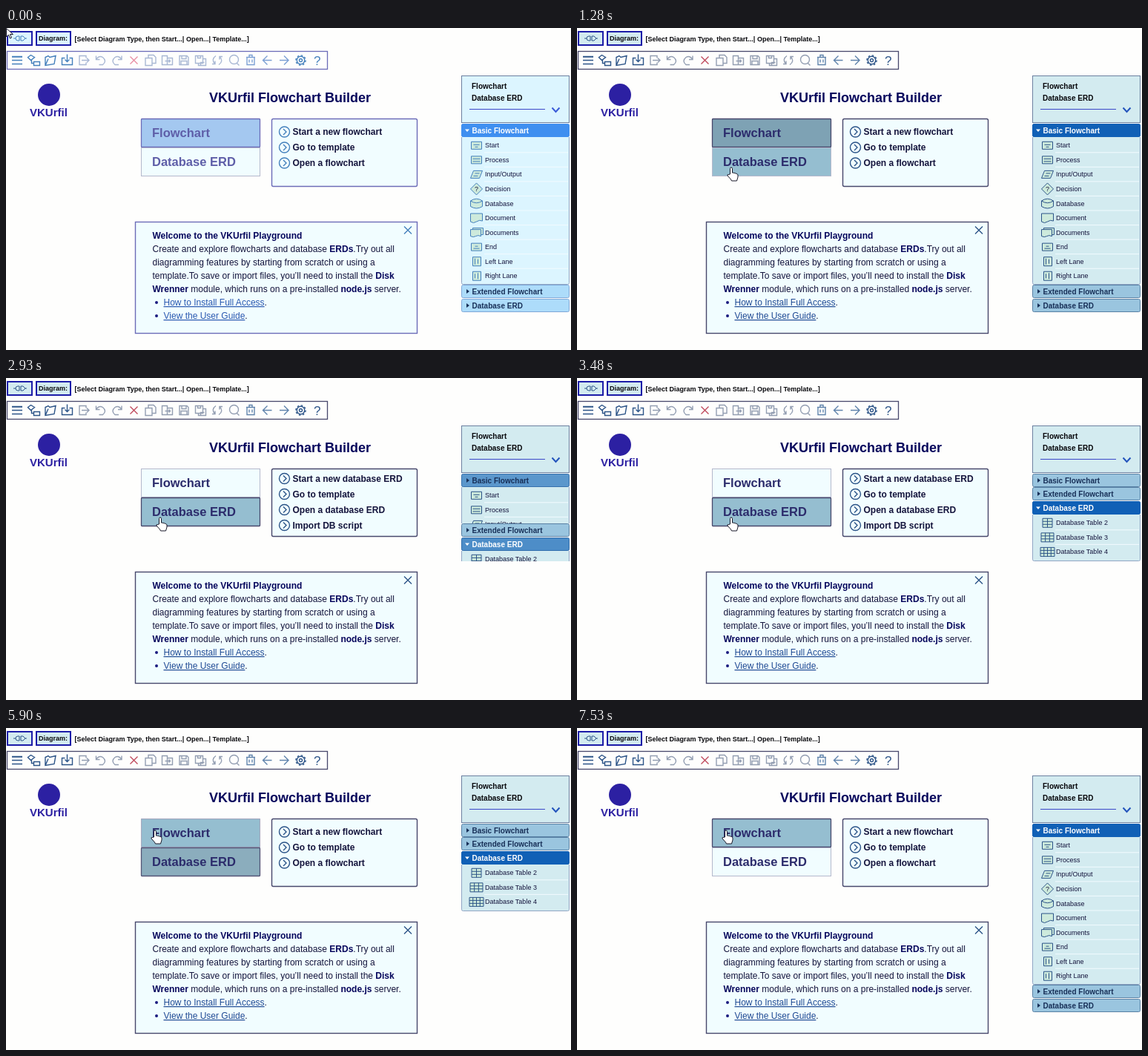
These frames come from a looping animation (762x434 px, 8000 ms). An HTML page:

```html
<!DOCTYPE html>
<html lang="en">
<head>
<meta charset="utf-8">
<title>Flowchart Builder</title>
<style>
html, body { margin: 0; width: 100%; height: 100%; overflow: hidden; background: #fefefd; }
svg { display: block; }
#stage { width: 762px; height: 434px; }
text { font-family: "Liberation Sans", Arial, sans-serif; font-size: 12px; fill: #14143c; white-space: pre; }
.b { font-weight: bold; }
.navy { fill: #06065c; }
.black { fill: #08080c; }
.icon { fill: none; stroke: var(--icon); stroke-width: 1.4; }
.off { stroke: var(--off); }
.shape { fill: #cdeadc; stroke: var(--icon); stroke-width: 1; }
.link { fill: var(--link); text-decoration: underline; }
.panel { fill: var(--panel); }
.card { fill: #f1fdff; stroke: var(--frame); stroke-width: 1.4; }
.frame { fill: none; stroke: var(--frame); stroke-width: 1.3; }
.tag { fill: var(--panel); stroke: #1c1ca8; stroke-width: 2; }
.bar { fill: var(--bar); stroke: var(--edge); }
.active { fill: var(--active); stroke: var(--active); }
</style>
</head>
<body>
<svg id="stage" viewBox="0 0 762 434"></svg>
<script>
const LOOP = 8000;
const BASIC_HEIGHT = 199, ERD_HEIGHT = 63;
const CLICK_ERD = 2450, CLICK_FLOW = 5880;
const OPEN_ERD = 2730, OPEN_BASIC = 6370;

// Each colour settles from its first value to its second as the loop begins.
const palette = {
  panel: ['#dcf5ff', '#d3ebf0'],
  bar: ['#addcfa', '#9ac5df'],
  edge: ['#7fa8d8', '#5880a4'],
  active: ['#3f8ff0', '#1060b6'],
  chosen: ['#a4c8f0', '#7ea2b4'],
  label: ['#5e5ea8', '#2c2c6c'],
  icon: ['#4480bc', '#2c5488'],
  off: ['#a9b8d4', '#939eb2'],
  arrow: ['#7ca0d4', '#6084ac'],
  cross: ['#e88fa4', '#c04a5c'],
  frame: ['#6c6cb8', '#48486c'],
  link: ['#2a58b0', '#204a94'],
  accent: ['#3c5cd8', '#2454bc'],
};

const rect = (x, y, w, h, attrs = '') => `<rect x="${x}" y="${y}" width="${w}" height="${h}" ${attrs}/>`;
const text = (x, y, s, size = 12, cls = '') => `<text x="${x}" y="${y}" style="font-size:${size}px" class="${cls}">${s}</text>`;
const bold = (x, y, s, size = 12, cls = '') => text(x, y, s, size, 'b ' + cls);
const path = (x, y, d, attrs) => `<path transform="translate(${x} ${y})" d="${d}" ${attrs}/>`;
const strong = s => `<tspan class="b navy">${s}</tspan>`;

// Paths around each icon's centre, with the colour where it is not the usual one
const toolbar = [
  ['M-7-5H7M-7 0H7M-7 5H7M-7-4.500H7M-7.500H7M-7 4.500H7'],
  ['M-8-4l4-3 5 3-5 4zM-3 0v4h3M0 2h8v5H0z'],
  ['M-7 7V-4l4-2 2 2 8-2-2 11zM-7 7l4-9'],
  ['M-3-3h-4V6H7V-3H3M0-8V2M-3-1l3 3 3-3'],
  ['M3-3V-6H-6V6H3V3M-3 0H7M4-3l3 3-3 3', 'off'],
  ['M-6-6v5h5M-6-1Q-2-7 3-4 9 1 3 6H-2', 'off'],
  ['M6-6v5H1M6-1Q2-7-3-4-9 1-3 6H2', 'off'],
  ['M-5-5L5 5M5-5L-5 5', 'cross'],
  ['M-7-3H2V7H-7ZM-3-3V-7H4L7-4V4H2', 'off'],
  ['M-7-6H0V6H-7ZM0-3H7V6H0M-3 1H4M2-1l2 2-2 2', 'off'],
  ['M-6-6H4L6-4V6H-6ZM-3-6v4h6v-4M-4 6V1h8v5', 'off'],
  ['M-7-6H3V4H-7ZM-4-6v3h4v-3M-3 4v3H7V-2H3M0 7V3h5', 'off'],
  ['M-2-6Q-9-1-3 5M-3 1v4h-4M2 6Q9 1 3-5M3-1v-4h4', 'off'],
  ['M-6-1a6 6 0 1 0 12 0a6 6 0 1 0-12 0M4 4l3 3', 'off'],
  ['M-6-4H6M-2-4v-3h4v3M-5-4V6H5V-4M-2-1v4M2-1v4', 'arrow'],
  ['M6 0H-5M0-6l-6 6 6 6', 'arrow'],
  ['M-6 0H5M0-6l6 6-6 6', 'arrow'],
].map(([d, color = 'icon'], i) => path(15 + i * 22.5, 43.5, d, `class="icon" style="stroke:var(--${color})"`)).join('');

const gear = `<g transform="translate(397.5 43.5)" class="icon"><circle r="5.2"/><circle r="2"/>
  <circle r="6.6" stroke-dasharray="2.6 2.58"/></g>`;

const doc = 'M-8-6H8V4Q4 2 0 5T-8 5Z';
const basicItems = [
  ['Start', 'M-7-5H7V5H-7ZM-4-1H4M-2 2H2'],
  ['Process', 'M-7-5H7V5H-7ZM-5-1.5H5M-5 2H5'],
  ['Input/Output', 'M-4-5H8L4 5H-8ZM-2-1.5H4M-4 2H2'],
  ['Decision', 'M0-8L8 0 0 8-8 0Z'],
  ['Database', 'M-8-3.5V4Q0 9 8 4V-3.5Q0-9-8-3.5 0 2 8-3.5'],
  ['Document', doc],
  ['Documents', 'M-5-4V-6H9V3H6M-8-4H6V5Q2 3-1 5T-8 5Z'],
  ['End', 'M-7-5H7V5H-7ZM-2-1H2M-4 2H4'],
  ['Left Lane', 'M-5-6H6V6H-5ZM-2-4V4M2-3V3'],
  ['Right Lane', 'M-5-6H6V6H-5ZM-2-3V3M2-4V4'],
];
const erdItems = [[2, 13], [3, 17], [4, 19]].map(([columns, w]) => {
  let d = `M${-w / 2}-6h${w}v12h${-w}zM${-w / 2}-2h${w}m0 4h${-w}`;
  for (let i = 1; i < columns; i++) d += `M${-w / 2 + w * i / columns}-6v12`;
  return ['Database Table ' + columns, d];
});

const content = (id, items, height) => `<svg id="${id}" x="614" width="147" height="${height}">
  ${rect(.5, -2, 145, height + 1.5, 'rx="2" class="panel" stroke="#91a6c4"')}` +
  items.map(([label, d], i) => {
    const y = 11.3 + i * 19.55;
    return path(20.5, y, d, 'class="shape"') +
      (label === 'Decision' ? text(18, y + 3, '?', 9) : '') +
      text(32, y + 3, label, 9) +
      (i < items.length - 1 ? rect(31, y + 9, 113, 1, 'fill="#f2fbff"') : '');
  }).join('') + '</svg>';

const header = (id, label) => `<g id="${id}">
  ${rect(614.5, .5, 145, 17, 'rx="2" class="bar"')}
  ${rect(614.5, .5, 145, 17, 'rx="2" class="active"')}
  <path class="arrow"/>${bold(628.5, 12.5, label, 10)}</g>`;

const button = (id, y, label) => `<g id="${id}">
  ${rect(182.5, y + .5, 160, 38, 'fill="#f1fdff" stroke="#b4b8cc"')}
  ${rect(183, y + 1, 159, 37, 'style="fill:var(--chosen)" class="chosen"')}
  ${rect(183, y + 1, 159, 37, 'fill="#95bed0" class="hover"')}
  ${rect(182.5, y + .5, 160, 38, 'rx="1" class="frame chosen"')}
  <text x="197" y="${y + 24.5}" class="b" style="font-size:16.5px;fill:var(--label)">${label}</text></g>`;

const menu = (id, y, labels) => `<g id="${id}">` + labels.map((label, i) =>
  `<g class="icon"><circle cx="375.5" cy="${y + i * 21}" r="7"/>` +
  path(375.5, y + i * 21, 'M-1.5-4L2.5 0-1.5 4') + '</g>' +
  bold(386.5, y + 4 + i * 21, label)).join('') + '</g>';

const paragraph = [
  strong('Welcome to the VKUrfil Playground'),
  `Create and explore flowcharts and database ${strong('ERDs')}.Try out all`,
  'diagramming features by starting from scratch or using a',
  `template.To save or import files, you’ll need to install the ${strong('Disk')}`,
  `${strong('Wrenner')} module, which runs on a pre-installed ${strong('node.js')} server.`,
].map((s, i) => text(197.5, 284 + i * 18, s)).join('');
const links = ['How to Install Full Access', 'View the User Guide'].map((s, i) =>
  `<circle cx="203" cy="${370 + i * 18}" r="2" fill="#1c1c80"/>` +
  text(212.5, 374 + i * 18, `<tspan class="link">${s}</tspan>.`)).join('');

const stage = document.getElementById('stage');
stage.innerHTML =
  rect(2, 5, 33, 18, 'class="tag"') +
  path(19, 14, 'M-9 0h3M-1-3h-2a3 3 0 0 0 0 6h2zM1-3h3l3 3-3 3H1zM7 0h2', 'class="icon" style="stroke-width:1"') +
  rect(41, 5, 46, 18, 'class="tag"') +
  bold(44, 17, 'Diagram:', 9, 'black') +
  bold(92.5, 17.5, '[Select Diagram Type, then Start...| Open...| Template...]', 9, 'black') +
  rect(1.5, 31.5, 432, 24, 'class="frame"') +
  toolbar + gear +
  '<text x="415" y="49.5" style="font-size:17px;fill:var(--icon)">?</text>' +
  '<circle cx="58" cy="90" r="15" fill="#2c20a2"/>' +
  '<text x="32" y="119" class="b" style="font-size:15px;fill:#2c20a2">VKUrfil</text>' +
  bold(274, 100, 'VKUrfil Flowchart Builder', 18, 'navy') +
  button('flow', 122, 'Flowchart') + button('erd', 161, 'Database ERD') +
  rect(358.5, 122.5, 196, 91, 'rx="2" class="card"') +
  menu('flowMenu', 140, ['Start a new flowchart', 'Go to template', 'Open a flowchart']) +
  menu('erdMenu', 135.5, ['Start a new database ERD', 'Go to template', 'Open a database ERD', 'Import DB script']) +
  rect(174.5, 261.5, 380, 150, 'class="card"') +
  path(542, 272.5, 'M-5-5L5 5M5-5L-5 5', 'class="icon"') +
  paragraph + links +
  rect(614.5, 64.5, 145, 63, 'class="panel" stroke="#6c80a0"') +
  bold(628, 82, 'Flowchart', 10, 'black') + bold(628, 98, 'Database ERD', 10, 'black') +
  rect(625, 109, 102, 1, 'fill="#3c48c8"') +
  path(741.5, 110.5, 'M-5-3L0 2.5 5-3', 'fill="none" style="stroke:var(--accent)" stroke-width="2"') +
  content('basicBody', basicItems, BASIC_HEIGHT) + content('erdBody', erdItems, ERD_HEIGHT) +
  header('basicHead', 'Basic Flowchart') + header('extHead', 'Extended Flowchart') + header('erdHead', 'Database ERD') +
  `<g id="cursor" fill="#fff" stroke="#181828"><path id="pointer" d="M.5.5V12l3-3 2 5 2-1-2-4.5h4z"/>
  <path id="hand" d="M-2 9V1.5a1.5 1.5 0 0 1 3 0V7l2 .3 2 .5 2 .7 1.5 1.2V13l-1.5 5h-7l-1-2-4.5-5q-.5-2 1.500-1.500z"/></g>`;

const el = Object.fromEntries([...stage.querySelectorAll('[id]')].map(node => [node.id, node]));
const ramp = (t, start, length) => Math.min(1, Math.max(0, (t - start) / length));
const swing = p => .5 - Math.cos(Math.PI * p) / 2;
const lerp = (a, b, p) => a + (b - a) * p;
const show = (node, visible) => node.setAttribute('visibility', visible ? 'visible' : 'hidden');

function drawPalette(p) {
  for (const [name, [from, to]] of Object.entries(palette))
    stage.style.setProperty('--' + name, `color-mix(in srgb, ${to} ${p * 100}%, ${from})`);
}

function drawButton(node, chosen, hover) {
  for (const part of node.querySelectorAll('.chosen')) part.setAttribute('opacity', chosen);
  show(node.querySelector('.hover'), hover);
}

function drawHeader(node, y, open, blue) {
  node.setAttribute('transform', `translate(0 ${y})`);
  node.querySelector('.active').setAttribute('opacity', blue);
  const color = open ? '#fff' : '#183058';
  node.querySelector('text').style.fill = color;
  const arrow = node.querySelector('.arrow');
  arrow.setAttribute('fill', color);
  arrow.setAttribute('d', open ? 'M619 7.5h6l-3 3.5z' : 'M621 6v6l4-3z');
}

function drawAccordion(t) {
  let basic, erd;
  if (t < OPEN_BASIC) {
    basic = Math.round(BASIC_HEIGHT * (1 - swing(ramp(t, OPEN_ERD, 300))));
    erd = Math.max(0, ERD_HEIGHT - basic);
  } else {
    erd = Math.round(ERD_HEIGHT * (1 - swing(ramp(t, OPEN_BASIC, 300))));
    basic = BASIC_HEIGHT - erd;
  }
  const erdOpen = t >= OPEN_ERD && t < OPEN_BASIC;
  const erdBlue = ramp(t, OPEN_ERD + 80, 220) - ramp(t, OPEN_BASIC + 80, 220);
  drawHeader(el.basicHead, 129, !erdOpen, 1 - erdBlue);
  drawHeader(el.extHead, 147 + basic, false, 0);
  drawHeader(el.erdHead, 166 + basic, erdOpen, erdBlue);
  el.basicBody.setAttribute('y', 147);
  el.basicBody.setAttribute('height', basic);
  el.erdBody.setAttribute('y', 184 + basic);
  el.erdBody.setAttribute('height', erd);
}

function draw(t) {
  const there = swing(ramp(t, 380, 800)), back = swing(ramp(t, 3650, 730));
  const x = lerp(0, 208.5, there) - 7 * back, y = lerp(0, 188, there) - 50 * back;
  const overButtons = x > 182 && x < 342 && y > 122 && y < 200;
  el.cursor.setAttribute('transform', `translate(${x} ${y})`);
  show(el.pointer, !overButtons);
  show(el.hand, overButtons);

  const erdChosen = ramp(t, CLICK_ERD, 170) - ramp(t, CLICK_FLOW, 170);
  drawButton(el.flow, 1 - erdChosen, overButtons && y < 161);
  drawButton(el.erd, erdChosen, overButtons && y >= 161);
  const erdMenu = t >= CLICK_ERD && t < CLICK_FLOW;
  show(el.flowMenu, !erdMenu);
  show(el.erdMenu, erdMenu);

  drawAccordion(t);
  drawPalette(ramp(t, 30, 170));
}

function tick() {
  draw(performance.now() % LOOP);
  requestAnimationFrame(tick);
}
tick();
</script>
</body>
</html>
```
